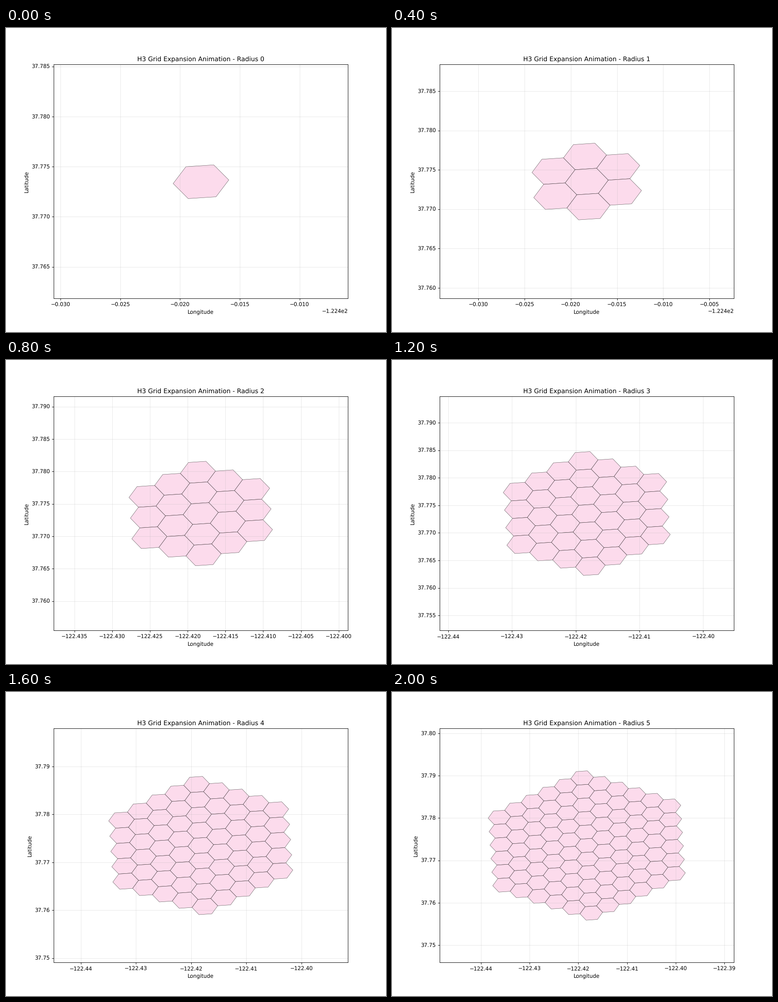
These frames come from a looping animation (837x669 px, 2.4 s). A matplotlib script:

```python
import matplotlib.pyplot as plt
import numpy as np
from matplotlib.animation import FuncAnimation
from matplotlib.collections import PolyCollection

W, H, DPI = 837, 669, 83.7
MARGIN = 0.01
RADII = 6

# Cell centre and corner offsets, in degrees (longitude, latitude)
CENTER = np.array([-122.41827101, 37.77351513])
A = np.array([0.00125962, -0.00150455])
C = np.array([0.00107132, 0.00168267])
B = A + C
CORNERS = np.array([A, B, C, -A, -B, -C])
STEP_I, STEP_J = A + B, B + C  # neighbouring centres, 60 degrees apart

plt.rcParams.update({"font.family": "DejaVu Sans", "text.hinting": "none"})
fig, ax = plt.subplots(figsize=((W + 1e-6) / DPI, (H + 1e-6) / DPI), dpi=DPI)


def grid_disk(radius):
    """Corners of every cell within the given number of rings."""
    span = range(-radius, radius + 1)
    return np.array([CENTER + i * STEP_I + j * STEP_J + CORNERS
                     for i in span for j in span if abs(i + j) <= radius])


def draw(radius):
    ax.clear()
    cells = grid_disk(radius)
    ax.add_collection(PolyCollection(cells, facecolor="#fccde5",
                                     edgecolor="black", linewidth=0.5,
                                     alpha=0.7))
    low = cells.min(axis=(0, 1)) - MARGIN
    high = cells.max(axis=(0, 1)) + MARGIN
    ax.set_xlim(low[0], high[0])
    ax.set_ylim(low[1], high[1])
    ax.set_title(f"H3 Grid Expansion Animation - Radius {radius}")
    ax.set_xlabel("Longitude")
    ax.set_ylabel("Latitude")
    ax.grid(True, alpha=0.3)
    return []


anim = FuncAnimation(fig, draw, frames=RADII, interval=400,
                     init_func=lambda: draw(0), repeat=True, repeat_delay=0)
plt.show()
```
